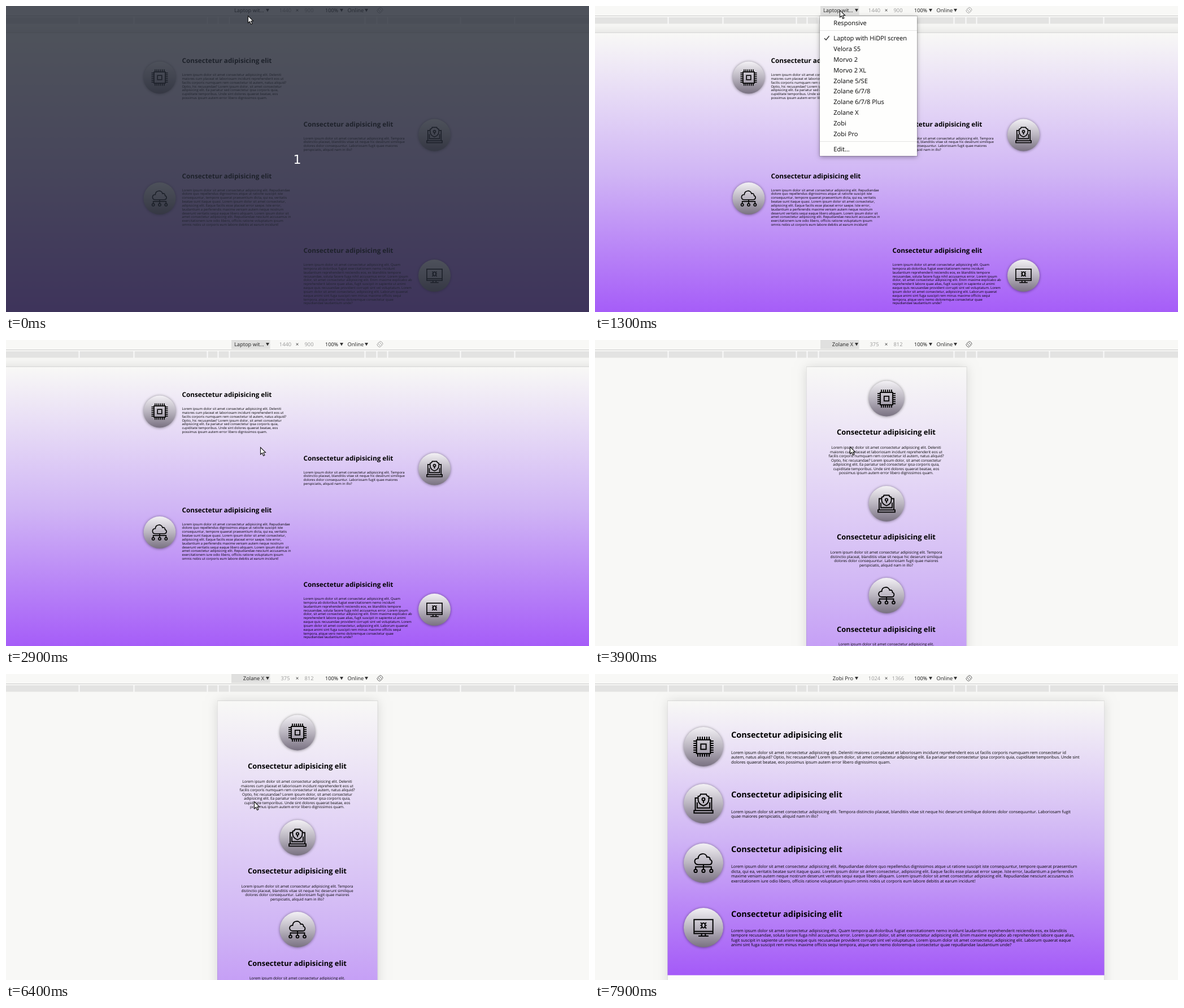
An HTML page with a canvas that plays this animation: 1032x543 px, repeating every 8000 ms.

```html
<!DOCTYPE html>
<html lang="en">
<head>
<meta charset="utf-8">
<title>Responsive layout demo</title>
<style>
  html, body { margin: 0; width: 100%; height: 100%; overflow: hidden; background: #f8f8f6; }
  canvas { display: block; width: 1032px; height: 543px; }
</style>
</head>
<body>
<canvas id="stage" width="1032" height="543"></canvas>
<script>
const ctx = document.getElementById('stage').getContext('2d');
const W = 1032, H = 543, LOOP = 8000, STEP = 100;
const FONT = '"Open Sans", "Noto Sans", sans-serif';
const TITLE = 'Consectetur adipisicing elit';

// Line breaks: | narrow column, ~ wide column, ^ both
const COPY = [
  'Lorem ipsum dolor sit amet consectetur adipisicing elit. Deleniti|maiores cum placeat et laboriosam incidunt reprehenderit eos ut|facilis corporis numquam rem consectetur id~autem, natus aliquid?|Optio, hic recusandae? Lorem ipsum dolor, sit amet consectetur|adipisicing elit. Ea pariatur sed consectetur ipsa corporis quia,|cupiditate temporibus. Unde sint~dolores quaerat beatae, eos|possimus ipsum autem error libero dignissimos quam.',
  'Lorem ipsum dolor sit amet consectetur adipisicing elit. Tempora|distinctio placeat, blanditiis vitae sit neque hic deserunt similique|dolores dolor consequuntur. Laboriosam fugit~quae maiores|perspiciatis, aliquid nam in illo?',
  'Lorem ipsum dolor sit amet consectetur adipisicing elit. Repudiandae|dolore quo repellendus dignissimos atque ut ratione suscipit iste|consequuntur, tempore quaerat praesentium~dicta, qui ea, veritatis|beatae sunt itaque quasi. Lorem ipsum dolor sit amet consectetur,|adipisicing elit. Eaque facilis esse placeat error saepe. Iste error,|laudantium a perferendis~maxime veniam autem neque nostrum|deserunt veritatis sequi eaque libero aliquam. Lorem ipsum dolor sit|amet consectetur adipisicing elit. Repudiandae nesciunt accusamus in^exercitationem iure odio libero, officiis ratione voluptatum ipsum|omnis nobis ut corporis eum labore debitis at earum incidunt!',
  'Lorem ipsum dolor sit amet consectetur adipisicing elit. Quam|tempora ab doloribus fugiat exercitationem nemo incidunt|laudantium reprehenderit reiciendis eos, ex blanditiis~tempore|recusandae, soluta facere fuga nihil accusamus error. Lorem ipsum|dolor, sit amet consectetur adipisicing elit. Enim maxime explicabo ab|reprehenderit labore quae alias,~fugit suscipit in sapiente ut animi|eaque quis recusandae provident corrupti sint vel voluptatum. Lorem|ipsum dolor sit amet consectetur, adipisicing elit. Laborum quaerat|eaque~animi sint fuga suscipit rem minus maxime officiis sequi|tempora, atque vero nemo doloremque consectetur quae|repudiandae laudantium unde?'
];
const PHONE_COPY = COPY.slice(0, 2).concat('Lorem ipsum dolor sit amet consectetur adipisicing elit.');

// Each section: circle x, circle y, text x, title y, first text line y
const LAPTOP = {
  label: 'Laptop wit…', size: [1440, 900], item: 1, x: -28, w: 1088, end: 551, copy: COPY,
  r: 28.5, title: 11.72, body: 5.95, pitch: 6.83,
  rows: [[272, 127, 311.5, 97, 122], [758.5, 229, 526.5, 209.5, 234.5],
         [272, 341.5, 311.5, 301.5, 326.5], [758.5, 478.5, 526.5, 434, 459]]
};
const PHONE = {
  label: 'Zolane X', size: [375, 812], item: 8, x: 374, w: 283.5, end: 848, copy: PHONE_COPY,
  r: 31.5, title: 12.9, body: 6.57, pitch: 7.45, align: 'center',
  rows: [[516, 104, 515.5, 163.5, 191], [516, 290.5, 515.5, 349.5, 377], [516, 453.5, 515.5, 513.5, 540]]
};
const TABLET = {
  label: 'Zobi Pro', size: [1024, 1366], item: 10, x: 128.5, w: 773, end: 534.5, copy: COPY, wide: true,
  r: 35, title: 14.5, body: 7.3, pitch: 8.5,
  rows: [[192, 129, 241, 108, 139], [192, 230, 241, 214, 244],
         [192, 335.5, 241, 311, 341.5], [192, 450, 241, 425.5, 455]]
};

const ITEMS = ['Responsive', 'Laptop with HiDPI screen', 'Velora S5', 'Morvo 2', 'Morvo 2 XL', 'Zolane 5/SE',
  'Zolane 6/7/8', 'Zolane 6/7/8 Plus', 'Zolane X', 'Zobi', 'Zobi Pro', 'Edit…'];
const itemY = i => i === 0 ? 30 : i === 11 ? 254.3 : 57.3 + (i - 1) * 18.85;

// Pointer path: time, x, y
const PATH = [[200, 428, 17], [400, 433, 6], [1200, 433, 6], [1300, 433, 7], [1400, 434, 18], [1800, 442, 143],
  [1900, 442, 143], [2300, 449, 202], [2500, 449, 202], [2600, 450, 190], [3300, 450, 190], [3400, 451, 189],
  [3900, 451, 189], [4500, 440, 8], [5100, 440, 8], [5200, 440, 7], [5900, 439, 226], [7100, 439, 226], [7400, 266, 87]];

function pointer(t) {
  const n = PATH.findIndex(p => p[0] >= t);
  if (n < 0) return PATH[PATH.length - 1].slice(1);
  if (n === 0) return PATH[0].slice(1);
  const a = PATH[n - 1], b = PATH[n], k = (t - a[0]) / (b[0] - a[0]);
  return [a[1] + (b[1] - a[1]) * k, a[2] + (b[2] - a[2]) * k];
}

function text(s, x, y, size, color = '#000', align = 'left', weight = 400) {
  ctx.font = `${weight} ${size}px ${FONT}`;
  ctx.fillStyle = color;
  ctx.textAlign = align;
  ctx.fillText(s, x, y + size * 0.35);
}

function rect(x, y, w, h, color) {
  ctx.fillStyle = color;
  ctx.fillRect(x, y, w, h);
}

function line(...pts) {
  ctx.beginPath();
  for (let i = 0; i < pts.length; i += 2) ctx.lineTo(pts[i], pts[i + 1]);
  ctx.stroke();
}

function ring(x, y, r) {
  ctx.beginPath();
  ctx.arc(x, y, r, 0, Math.PI * 2);
  ctx.stroke();
}

function shadow(color, blur, dy = 0) {
  ctx.shadowColor = color;
  ctx.shadowBlur = blur;
  ctx.shadowOffsetY = dy;
}

// Icons live in a box from -16 to 16
function chip() {
  ctx.strokeRect(-11, -11, 22, 22);
  ctx.strokeRect(-4.2, -4.2, 8.4, 8.4);
  for (let i = 0; i < 4; i++) {
    ctx.rotate(Math.PI / 2);
    for (let p = -9; p <= 9; p += 3.6) line(p, -11, p, -16);
  }
}

function shield() {
  ctx.strokeRect(-15, 11, 30, 4);
  line(-9, -9, -13, -9, -13, 11);
  line(9, -9, 13, -9, 13, 11);
  line(-10, -2, -10, 7, 10, 7, 10, -2);
  ctx.beginPath();
  ctx.moveTo(-8.5, -11.5);
  ctx.quadraticCurveTo(-5, -12, -4.5, -15);
  ctx.lineTo(4.5, -15);
  ctx.quadraticCurveTo(5, -12, 8.5, -11.5);
  ctx.lineTo(8.5, -5.5);
  ctx.quadraticCurveTo(7.5, 1, 0, 3.5);
  ctx.quadraticCurveTo(-7.5, 1, -8.5, -5.5);
  ctx.closePath();
  ctx.stroke();
  ring(0, -7, 2.2);
  line(0, -5, 0, -1);
}

function cloud() {
  ctx.beginPath();
  ctx.moveTo(-8.5, 2.5);
  ctx.bezierCurveTo(-16, 2, -15.5, -8, -8.5, -7.5);
  ctx.bezierCurveTo(-8, -16.5, 4, -17, 5.5, -9.5);
  ctx.bezierCurveTo(9, -10.5, 11, -8, 10.5, -5.5);
  ctx.bezierCurveTo(15, -4, 14, 2.5, 9, 2.5);
  ctx.closePath();
  ctx.stroke();
  line(0, 2.5, 0, 10);
  line(-12.5, 10, -12.5, 6, 12.5, 6, 12.5, 10);
  for (const x of [-12.5, 0, 12.5]) ring(x, 12.5, 2.4);
}

function monitor() {
  ctx.strokeRect(-15, -12.8, 30, 22.3);
  line(-15, 6, 15, 6);
  line(-3, 9.5, -3, 13);
  line(3, 9.5, 3, 13);
  line(-8, 13.5, 8, 13.5);
  ctx.beginPath();
  ctx.ellipse(0, -3.5, 2.6, 4, 0, 0, Math.PI * 2);
  ctx.stroke();
  for (const s of [-1, 1]) {
    line(s * 2, -5.5, s * 4.5, -8);
    line(s * 2, -3.5, s * 5, -3.5);
    line(s * 2, -1.5, s * 4.5, 1.5);
  }
}

const ICONS = [chip, shield, cloud, monitor];

function badge(x, y, r, icon) {
  const g = ctx.createLinearGradient(0, y - r, 0, y + r);
  g.addColorStop(0, '#f3f1f5');
  g.addColorStop(0.5, '#bab5c0');
  g.addColorStop(1, '#797181');
  ctx.save();
  shadow('rgba(0,0,0,.45)', 5, 0.5);
  ctx.fillStyle = g;
  ctx.beginPath();
  ctx.arc(x, y, r, 0, Math.PI * 2);
  ctx.fill();
  ctx.restore();
  ctx.save();
  ctx.translate(x, y);
  ctx.scale(r / 31.5, r / 31.5);
  ctx.strokeStyle = '#000';
  ctx.lineWidth = 1.8;
  icon();
  ctx.restore();
}

function page(d) {
  ctx.save();
  ctx.beginPath();
  ctx.rect(0, 32, W, H);
  ctx.clip();
  shadow('rgba(0,0,0,.13)', 18);
  rect(d.x, 48, d.w, 1100, '#fcfcfb');
  ctx.restore();
  const g = ctx.createLinearGradient(0, 48, 0, d.end);
  g.addColorStop(0, '#f8f8f6');
  g.addColorStop(0.5, '#d0b5f5');
  g.addColorStop(1, '#a45af8');
  rect(d.x, 48, d.w, d.end - 48, g);
  ctx.strokeStyle = 'rgba(0,0,0,.08)';
  ctx.lineWidth = 1;
  ctx.strokeRect(Math.floor(d.x) + 0.5, 47.5, d.w, 1100);

  d.rows.forEach(([cx, cy, tx, ty, by], i) => {
    badge(cx, cy, d.r, ICONS[i]);
    text(TITLE, tx, ty, d.title, '#000', d.align, 700);
    const [split, join] = d.wide ? [/[~^]/, /\|/g] : [/[|^]/, /~/g];
    d.copy[i].replace(join, ' ').split(split)
      .forEach((s, n) => text(s, tx, by + n * d.pitch, d.body, '#000', d.align));
  });
}

function arrowDown(x) {
  ctx.fillStyle = '#333';
  ctx.beginPath();
  ctx.moveTo(x - 3, 5);
  ctx.lineTo(x + 3, 5);
  ctx.lineTo(x, 10.5);
  ctx.fill();
}

function toolbar(d, active) {
  rect(0, 0, W, 17, '#f8f8f6');
  rect(0, 17, W, 1, '#cccccb');
  rect(0, 18, W, 2, '#f8f8f6');
  rect(0, 20, W, 11.5, '#e3e3e2');
  for (const x of [129, 226, 356, 375, 395, 635, 656, 675, 804, 900]) rect(x - 0.5, 19, 2, 13, '#fafaf9');
  if (active) rect(399, 0, 68.5, 16, '#e0e0df');

  if (d === LAPTOP) text(d.label, 404, 8, 9.3, '#222');
  else text(d.label, 457, 8, 9.3, '#222', 'right');
  arrowDown(463);
  text(d.size[0], 494.5, 8, 9.3, '#999', 'center');
  text('×', 515.5, 8, 9.8, '#333', 'center');
  text(d.size[1], 536.5, 8, 9.3, '#999', 'center');
  text('100%', 565, 8, 9.1, '#111');
  arrowDown(594);
  text('Online', 604.5, 8, 9.4, '#222');
  arrowDown(638);

  ctx.save();
  ctx.translate(662, 7.5);
  ctx.rotate(-Math.PI / 4);
  ctx.strokeStyle = d === LAPTOP ? '#999' : '#555';
  ctx.lineWidth = 0.9;
  ctx.strokeRect(-1.7, -3.8, 3.4, 7.6);
  for (const a of [-0.9, 2.24]) {
    ctx.beginPath();
    ctx.arc(0, 0, 5, a, a + 1.8);
    ctx.stroke();
  }
  ctx.restore();
}

function menu(d, y, alpha) {
  ctx.save();
  ctx.globalAlpha = alpha;
  ctx.save();
  shadow('rgba(0,0,0,.35)', 8, 2);
  rect(398, 18, 172, 248, '#fefefd');
  ctx.restore();
  ctx.strokeStyle = 'rgba(0,0,0,.16)';
  ctx.lineWidth = 1;
  ctx.strokeRect(397.5, 17.5, 173, 249);
  rect(398, 43, 172, 1, '#e4e4e3');
  rect(398, 240, 172, 1, '#e4e4e3');
  ITEMS.forEach((s, i) => {
    const cy = itemY(i);
    if (Math.abs(y - cy) < 9.4) rect(398, cy - 9.4, 172, 18.8, '#e6e6e5');
    text(s, 422.3, cy, 11.08);
  });
  const cy = itemY(d.item);
  ctx.strokeStyle = '#333';
  ctx.lineWidth = 1.4;
  line(406, cy, 409, cy + 3, 414.5, cy - 4);
  ctx.restore();
}

function cursor(x, y) {
  ctx.save();
  ctx.translate(x + 0.5, y + 0.5);
  ctx.beginPath();
  for (const [px, py] of [[0, 0], [0, 12.5], [3, 10], [5.2, 15], [7.4, 14], [5.2, 9.2], [9, 9]]) ctx.lineTo(px, py);
  ctx.closePath();
  ctx.fillStyle = '#fff';
  ctx.fill();
  ctx.strokeStyle = '#111';
  ctx.lineWidth = 1.1;
  ctx.stroke();
  ctx.restore();
}

function menuAlpha(t) {
  for (const [open, close] of [[600, 2900], [4700, 6400]])
    if (t >= open && t < close) return t < open + STEP ? 0.6 : 1;
  return 0;
}

function draw(t) {
  const d = t < 3000 ? LAPTOP : t < 6500 ? PHONE : TABLET;
  const [x, y] = pointer(t);
  const alpha = menuAlpha(t);
  ctx.textRendering = 'geometricPrecision';
  rect(0, 0, W, H, '#f8f8f6');
  page(d);
  toolbar(d, t >= 600 && t < 7900);
  if (alpha) menu(d, y, alpha);
  if (t < STEP) {
    rect(0, 0, W, H, 'rgba(37,42,53,.8)');
    ctx.font = '22px "DejaVu Sans", sans-serif';
    ctx.textAlign = 'center';
    ctx.fillStyle = '#fff';
    ctx.fillText('1', 515.5, 279.5);
  }
  if (t < 7600) cursor(x, y);
}

const start = performance.now();
function tick(now) {
  const t = Math.max(0, now - start) % LOOP;
  draw(Math.floor(t / STEP) * STEP);
  requestAnimationFrame(tick);
}
draw(0);
requestAnimationFrame(tick);
</script>
</body>
</html>
```
